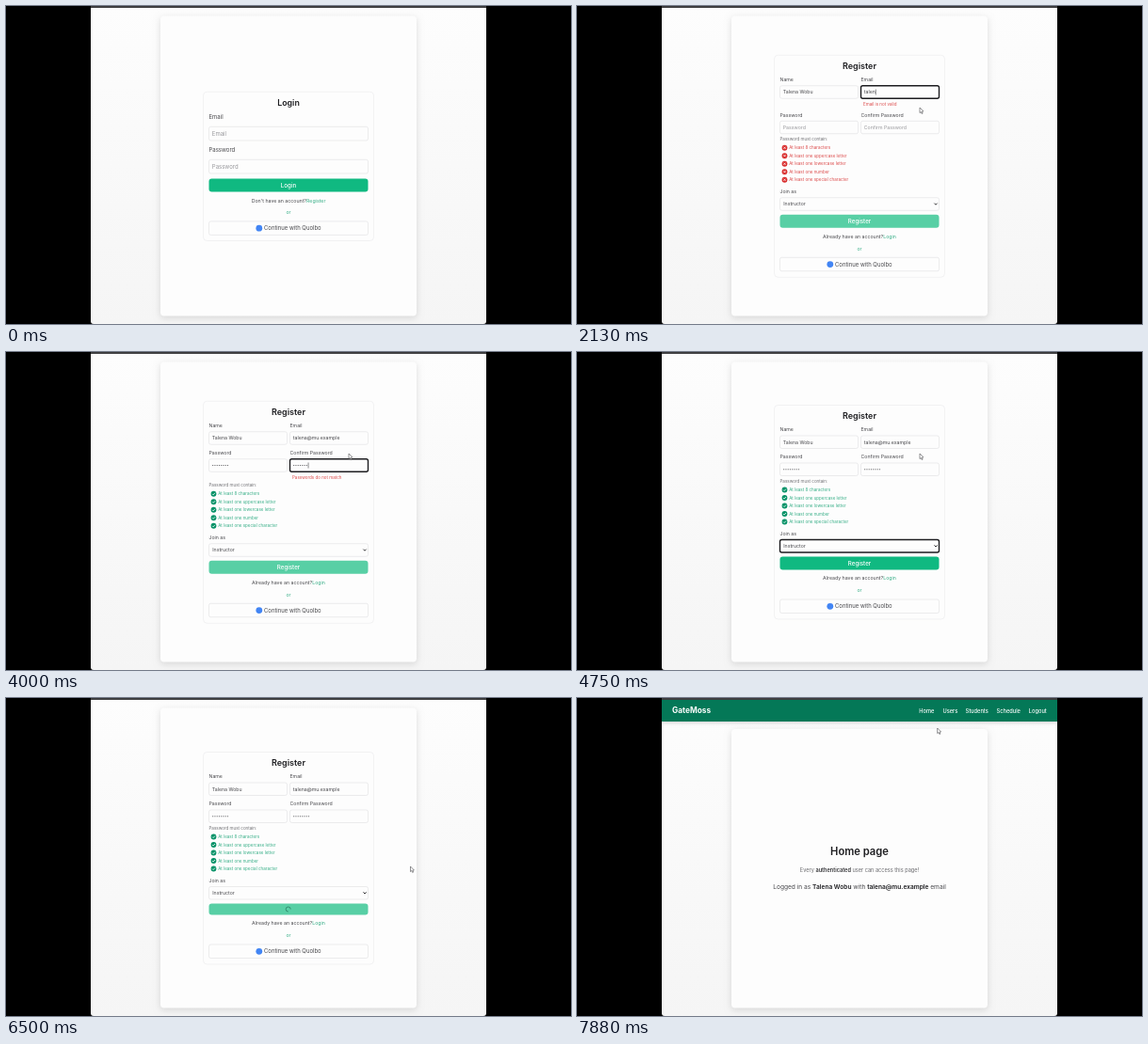
These frames come from a looping animation (600x338 px, 8000 ms). An HTML page with a canvas:

```html
<!DOCTYPE html>
<html lang="en">
<head>
<meta charset="utf-8">
<title>Login and register flow</title>
<style>
  html, body { margin: 0; width: 100%; height: 100%; overflow: hidden; background: #000; }
  canvas { display: block; width: 600px; height: 338px; }
</style>
</head>
<body>
<canvas id="stage"></canvas>
<script>
const W = 600, H = 338, LOOP = 8000, STEP = 125;
const FONT = 'Inter, "Open Sans", sans-serif';
const INK = '#1d1d20', TEXT = '#48484c', MUTED = '#98989c', LINE = '#e4e4e6';
const GREEN = '#10b981', PALE_GREEN = '#58cfa5', LINK = '#35ae86', RED = '#dc4a4a';
const PERSON = 'Talena Wobu', MAIL = 'talena@mu.example';
const PROVIDER = 'Quolbo', BRAND = 'GateMoss';

const canvas = document.getElementById('stage');
const ctx = canvas.getContext('2d');
const ratio = window.devicePixelRatio || 1;
canvas.width = W * ratio;
canvas.height = H * ratio;

const clamp = v => Math.max(0, Math.min(1, v));
const ease = v => v * v * (3 - 2 * v);
const typed = (t, start, step, total) =>
  Math.max(0, Math.min(total, Math.floor((t - start) / step)));

function box(x, y, w, h, r, fill, stroke, width = 0.7) {
  ctx.beginPath();
  ctx.roundRect(x, y, w, h, r);
  if (fill) { ctx.fillStyle = fill; ctx.fill(); }
  if (stroke) { ctx.strokeStyle = stroke; ctx.lineWidth = width; ctx.stroke(); }
}

function path(points, color, width) {
  ctx.beginPath();
  points.forEach(([x, y]) => ctx.lineTo(x, y));
  ctx.strokeStyle = color;
  ctx.lineWidth = width;
  ctx.stroke();
}

function dot(x, y, r, color) {
  ctx.beginPath();
  ctx.arc(x, y, r, 0, Math.PI * 2);
  ctx.fillStyle = color;
  ctx.fill();
}

function setFont(size, weight = 400) {
  ctx.font = `${weight} ${size}px ${FONT}`;
}

// Draws text around the vertical centre y and returns its width.
function text(str, x, y, size, color, weight = 400, align = 'left') {
  setFont(size, weight);
  ctx.textAlign = align;
  ctx.fillStyle = color;
  ctx.fillText(str, x, y + size * 0.36);
  return ctx.measureText(str).width;
}

// Parts are [string, color, weight], laid out in one centred line.
function richLine(parts, y, size) {
  let total = 0;
  for (const [str, , weight] of parts) {
    setFont(size, weight);
    total += ctx.measureText(str).width;
  }
  let x = W / 2 - total / 2;
  for (const [str, color, weight] of parts) x += text(str, x, y, size, color, weight);
}

function page(cardTop) {
  ctx.fillStyle = '#000';
  ctx.fillRect(0, 0, W, H);
  const shade = ctx.createLinearGradient(0, 0, 0, H);
  shade.addColorStop(0, '#fdfdfd');
  shade.addColorStop(1, '#f5f5f5');
  box(90, 0, 420, H, [0, 0, 3, 3], shade);
  ctx.fillStyle = '#3e3e40';
  ctx.fillRect(90, 0, 420, 2);
  ctx.save();
  ctx.shadowColor = 'rgba(0,0,0,.13)';
  ctx.shadowBlur = 7 * ratio;
  ctx.shadowOffsetY = 2 * ratio;
  box(164, cardTop, 272, 329.5 - cardTop, 4, '#fdfdfd');
  ctx.restore();
}

function field(x, y, w, h, { value = '', hint = '', size = 5.2, focus = false, dots = 0 }) {
  box(x, y, w, h, 2, '#fdfdfd', focus ? INK : LINE, focus ? 1.4 : 0.7);
  const mid = y + h / 2;
  let end = x + 3.3;
  if (dots) {
    for (let i = 0; i < dots; i++) dot(x + 4.2 + i * 2.25, mid, 0.6, TEXT);
    end += dots * 2.25;
  } else if (value) {
    end += text(value, end, mid, size, TEXT);
  } else {
    text(hint, end, mid, size, MUTED);
  }
  if (focus) path([[end + 0.5, mid - 3], [end + 0.5, mid + 3]], INK, 0.5);
}

function formFoot(y, question, link, gap) {
  richLine([[question, TEXT, 400], [link, LINK, 400]], y, 5.25);
  text('or', 300, y + gap, 5.2, LINK, 400, 'center');
  box(215.5, y + gap + 9.5, 169, 14.5, 2, '#fdfdfd', LINE);
  dot(268.8, y + gap + 16.8, 3.4, '#4285f4');
  text('Continue with ' + PROVIDER, 274, y + gap + 16.8, 5.95, TEXT);
}

function loginPage() {
  page(10.5);
  box(209.5, 91.2, 181, 158.3, 4, null, '#ececee');
  text('Login', 300, 102.5, 8.8, INK, 600, 'center');
  ['Email', 'Password'].forEach((name, i) => {
    const y = 118 + i * 35;
    text(name, 215.5, y, 6, TEXT);
    field(215.5, y + 10.3, 169, 14.7, { hint: name, size: 6 });
  });
  box(215.5, 183.5, 169, 14, 3, GREEN);
  text('Login', 300, 190.5, 6.2, '#fff', 500, 'center');
  formFoot(206.7, "Don't have an account?", 'Register', 12.7);
}

function rule(label, ok, y) {
  dot(220.5, y, 2.9, ok ? '#079268' : '#d92f2f');
  if (ok) {
    path([[219.1, y + 0.1], [220.1, y + 1.1], [222, y - 1]], '#fff', 0.8);
  } else {
    path([[219.4, y - 1.1], [221.6, y + 1.1]], '#fff', 0.8);
    path([[219.4, y + 1.1], [221.6, y - 1.1]], '#fff', 0.8);
  }
  text(label, 225.3, y, 4.5, ok ? LINK : RED);
}

function focusAt(t) {
  const order = [[5250, ''], [4375, 'role'], [3500, 'confirm'], [2875, 'password'],
    [1750, 'email'], [1000, 'name'], [0, '']];
  return order.find(([start]) => t >= start)[1];
}

function registerPage(t) {
  const focus = focusAt(t);
  const name = PERSON.slice(0, typed(t, 1000, 62, PERSON.length));
  const mail = MAIL.slice(0, typed(t, 1800, 62, MAIL.length));
  const secret = typed(t, 2860, 52, 8);
  const repeat = typed(t, 3500, 70, 8);
  const mailError = mail.length > 0 && mail.length < MAIL.length;
  const mismatch = secret > 0 && !mailError && t < 4250;
  const ready = t >= 4125, loading = t >= 5375;

  const extra = mailError || mismatch ? 8.5 : 0;
  const buttonH = loading ? 12 : 14;
  const total = 213.5 + buttonH + extra;
  const top = 170.25 - total / 2;

  page(10.5);
  box(209.5, top, 181, total, 4, null, '#ececee');
  text('Register', 300, top + 11.5, 9, INK, 600, 'center');

  let y = top + 26;
  text('Name', 215.5, y, 5.2, TEXT);
  text('Email', 301.5, y, 5.2, TEXT);
  field(215.5, y + 6.5, 83, 13.5, { value: name, hint: 'Name', focus: focus === 'name' });
  field(301.5, y + 6.5, 83, 13.5, { value: mail, hint: 'Email', focus: focus === 'email' });
  if (mailError) {
    text('Email is not valid', 304, y + 26, 4.5, RED);
    y += 8.5;
  }

  y += 29;
  text('Password', 215.5, y, 5.2, TEXT);
  text('Confirm Password', 301.5, y, 5.2, TEXT);
  field(215.5, y + 6.5, 83, 13.5, { dots: secret, hint: 'Password', focus: focus === 'password' });
  field(301.5, y + 6.5, 83, 13.5, { dots: repeat, hint: 'Confirm Password', focus: focus === 'confirm' });
  if (mismatch) text('Passwords do not match', 304, y + 26, 4.5, RED);

  y = top + extra + 81;
  text('Password must contain:', 215.5, y, 4.5, '#707074');
  [['8 characters', 8], ['one uppercase letter', 1], ['one lowercase letter', 2],
    ['one number', 6], ['one special character', 7]]
    .forEach(([label, need], i) => rule('At least ' + label, secret >= need, y + 9 + i * 8.5));

  text('Join as', 215.5, y + 55.5, 5.2, TEXT);
  const chosen = focus === 'role';
  box(215.5, y + 62, 169, 13.5, 2, '#fdfdfd', chosen ? INK : LINE, chosen ? 1.4 : 0.7);
  text('Instructor', 219.2, y + 68.7, 5.2, TEXT);
  path([[379.4, y + 67.9], [381, y + 69.5], [382.6, y + 67.9]], INK, 0.9);

  const by = y + 80;
  box(215.5, by, 169, buttonH, 3, ready && !loading ? GREEN : PALE_GREEN);
  if (loading) {
    const turn = Math.min(t, 6250) / 1000 * Math.PI * 2;
    ctx.beginPath();
    ctx.arc(299.7, by + 6, 2.5, turn, turn + Math.PI * 1.5);
    ctx.strokeStyle = '#2a7d63';
    ctx.lineWidth = 0.8;
    ctx.stroke();
  } else {
    text('Register', 300, by + 7, 6.2, '#fff', 500, 'center');
  }
  formFoot(by + buttonH + 9, 'Already have an account?', 'Login', 13);
}

function homePage() {
  page(33);
  ctx.save();
  ctx.shadowColor = 'rgba(0,0,0,.2)';
  ctx.shadowBlur = 4 * ratio;
  ctx.shadowOffsetY = ratio;
  ctx.beginPath();
  ctx.rect(90, 2, 420, 40);
  ctx.clip();
  box(90, 2, 420, 23, 0, '#047857');
  ctx.restore();
  text(BRAND, 101, 13.5, 8.3, '#fff', 700);
  [['Home', 363.3], ['Users', 388.5], ['Students', 412.5], ['Schedule', 445.5], ['Logout', 479.8]]
    .forEach(([label, x]) => text(label, x, 13.5, 5.7, '#fff', 500));
  text('Home page', 300, 163.3, 11.2, INK, 600, 'center');
  richLine([['Every ', '#6a6a6e', 400], ['authenticated', '#333336', 600],
    [' user can access this page!', '#6a6a6e', 400]], 182.5, 5.6);
  richLine([['Logged in as ', TEXT, 400], [PERSON, INK, 600], [' with ', TEXT, 400],
    [MAIL, INK, 600], [' email', TEXT, 400]], 200.5, 6.6);
}

// Keys are [time, x, y]; the pointer eases between neighbours.
const POINTER = [[750, 330, 206], [1250, 364, 108], [5000, 364, 108], [5250, 318, 224],
  [5375, 318, 224], [5700, 429.5, 179], [7000, 429.5, 179], [7875, 382.7, 32]];

function pointer(t) {
  if (t < POINTER[0][0]) return;
  let i = 0;
  while (i < POINTER.length - 2 && t >= POINTER[i + 1][0]) i++;
  const [t0, x0, y0] = POINTER[i], [t1, x1, y1] = POINTER[i + 1];
  const k = ease(clamp((t - t0) / (t1 - t0)));
  ctx.save();
  ctx.translate(x0 + (x1 - x0) * k, y0 + (y1 - y0) * k);
  ctx.beginPath();
  [[0, 0], [0, 5.6], [1.3, 4.5], [2.2, 6.5], [3.1, 6.1], [2.3, 4.2], [3.9, 4]]
    .forEach(([x, y]) => ctx.lineTo(x, y));
  ctx.closePath();
  ctx.fillStyle = '#fff';
  ctx.fill();
  ctx.strokeStyle = '#4a4a4e';
  ctx.lineWidth = 0.6;
  ctx.stroke();
  ctx.restore();
}

function draw(now) {
  const t = Math.floor((now % LOOP) / STEP) * STEP;
  ctx.setTransform(ratio, 0, 0, ratio, 0, 0);
  if (t < 750) loginPage();
  else if (t < 6750) registerPage(t);
  else homePage();
  pointer(t);
}

const start = performance.now();
function tick() {
  draw(performance.now() - start);
  requestAnimationFrame(tick);
}
tick();
</script>
</body>
</html>
```
